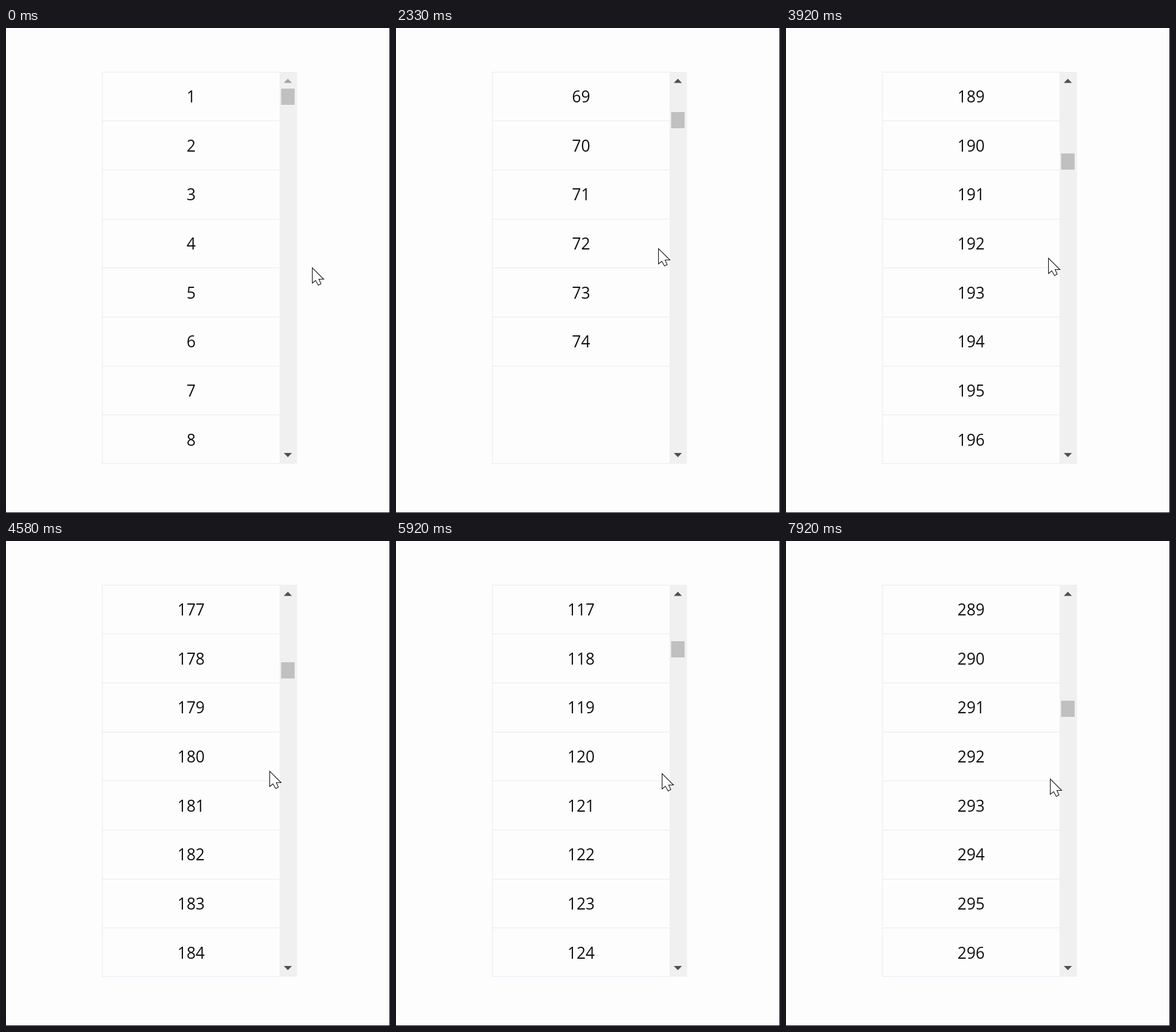
Animation of 640x808 px, one loop 8 s. Source, as an HTML page with a canvas:

```html
<!DOCTYPE html>
<html lang="en">
<head>
<meta charset="utf-8">
<title>Virtual list</title>
<style>
  html, body { margin: 0; width: 100%; height: 100%; overflow: hidden; background: #fdfdfd; }
  canvas { display: block; }
</style>
</head>
<body>
<canvas id="stage" width="640" height="808"></canvas>
<script>
const ctx = document.getElementById('stage').getContext('2d');
const LOOP = 8000, TICKS_PER_MS = 12 / 1000;
const LIST = { x: 160, y: 73, w: 296, h: 653 };
const ROW = 81.68, ROWS = 8, STEP = 4, GAP = 2;
const INK = '#111111', LINE = '#e9e9f3', DARK = '#505050';

// Key points: tick, top row, pointer x, pointer y
const keys = [
  [8, 0, 510, 399], [12, 0, 482, 388], [14, 0, 474, 371], [17, 0, 447, 344],
  [28, 68, 437, 367], [47, 188, 437, 383], [50, 208, 438, 383], [64, 116, 442, 382],
  [68, 96, 443, 385], [80, 176, 443, 393], [95, 288, 440, 396]
];
// Ticks on which the wheel and pointer pause
const rests = new Set([13, 15, 16, 18, 22, 26, 27, 30, 33, 34, 37, 44, 51, 52, 56, 58, 59, 72, 76, 83, 86, 89]);

function poseAt(time) {
  let tick = time;
  while (rests.has(tick)) tick--;
  const next = Math.max(1, keys.findIndex(key => key[0] >= tick));
  const a = keys[next - 1], b = keys[next];
  const k = Math.max(0, (tick - a[0]) / (b[0] - a[0]));
  const mix = i => a[i] + (b[i] - a[i]) * k;
  // Rendering lags now and then, but settles before each pause
  const late = a[1] !== b[1] && tick * 2 % 5 < 2 && !rests.has(tick + 1) && tick < 95;
  return {
    top: Math.round(mix(1) / STEP) * STEP,
    x: Math.round(mix(2)),
    y: Math.round(mix(3)),
    up: b[1] < a[1],
    blank: late ? GAP : 0
  };
}

function rect(x, y, w, h, color) {
  ctx.fillStyle = color;
  ctx.fillRect(x, y, w, h);
}

function shape(points, color) {
  ctx.beginPath();
  points.forEach(([x, y]) => ctx.lineTo(x, y));
  ctx.closePath();
  ctx.fillStyle = color;
  ctx.fill();
}

function drawRows({ top, up, blank }) {
  const from = up ? blank : 0;
  const to = up ? ROWS : ROWS - blank;
  ctx.font = '26.5px "Open Sans", "Noto Sans", sans-serif';
  ctx.textAlign = 'center';
  for (let i = from; i < to; i++) {
    const y = LIST.y + ROW * i;
    if (i < ROWS - 1) rect(LIST.x, Math.floor(y + ROW), LIST.w, 1, LINE);
    ctx.fillStyle = INK;
    ctx.fillText(top + i + 1, 308.5, Math.round(y + 51));
  }
}

function drawFrame() {
  const { x, y, w, h } = LIST;
  rect(x, y, w, 1, LINE);
  rect(x, y + h - 1, w, 1, LINE);
  rect(x, y, 1, h, LINE);
}

function drawArrow(y, dir, color) {
  shape([[463, y], [469.8, y + 7 * dir], [476.5, y]], color);
}

function drawBar(top) {
  rect(456, LIST.y, 29, LIST.h, '#f0f0f0');
  rect(458.5, Math.round(101 + top * 0.573), 22.5, 27, '#c0c0c0');
  drawArrow(91.5, -1, top ? DARK : '#a3a3a3');
  drawArrow(708, 1, DARK);
}

function drawPointer({ x, y }) {
  ctx.save();
  ctx.translate(x + 0.5, y + 0.5);
  shape([[0, 0], [0, 25.5], [5.5, 21], [10, 29], [14.5, 26.5], [11, 19], [19, 19]], '#ffffff');
  ctx.strokeStyle = INK;
  ctx.lineWidth = 1.1;
  ctx.stroke();
  ctx.restore();
}

function draw(ms) {
  const pose = poseAt(Math.floor((ms % LOOP + 5) * TICKS_PER_MS) % 96);
  rect(0, 0, 640, 808, '#fdfdfd');
  drawRows(pose);
  drawFrame();
  drawBar(pose.top);
  drawPointer(pose);
  rect(639, 0, 1, 808, INK);
  rect(0, 807, 640, 1, INK);
}

const began = performance.now();
function loop() {
  draw(performance.now() - began);
  requestAnimationFrame(loop);
}
loop();
</script>
</body>
</html>
```
